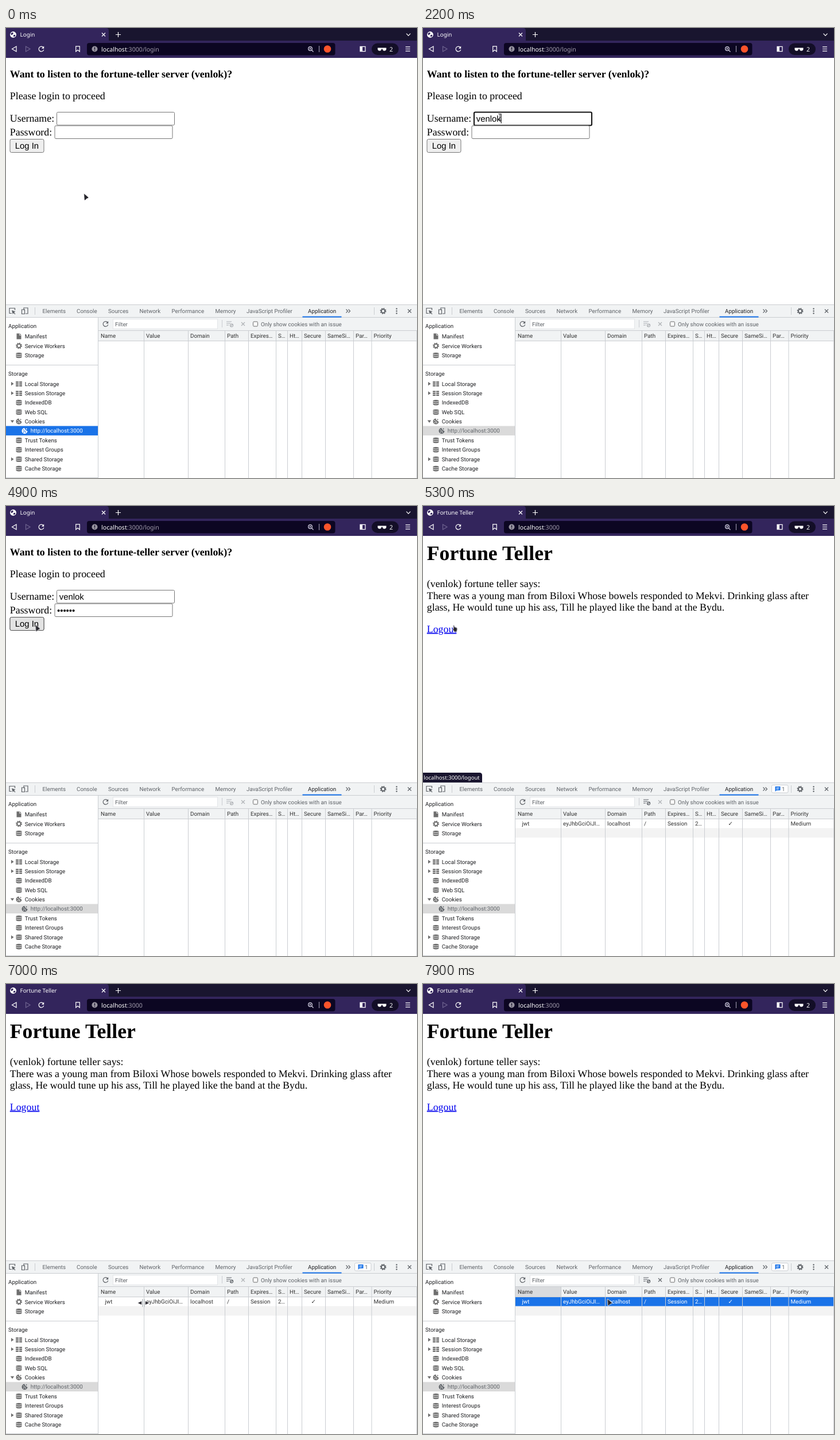
An HTML page for the animation above (8000 ms loop, 716x783 px).

```html
<!DOCTYPE html>
<html lang="en">
<head>
<meta charset="utf-8">
<title>Login demo</title>
<style>
html, body { margin: 0; width: 100%; height: 100%; overflow: hidden; background: #fff; }
svg { display: block; width: 716px; height: 783px; }
text { text-rendering: geometricPrecision; white-space: pre; }
.page { font: 17.85px "Liberation Serif", serif; }
.bold { font-weight: 700; }
.h1 { font: 700 35.7px "Liberation Serif", serif; }
.form { font: 14.88px "Liberation Sans", sans-serif; }
.tab { font: 9.9px "Noto Sans", sans-serif; fill: #fff; }
.url { font: 10.6px "Noto Sans", sans-serif; fill: #fff; }
.hint { font: 9.55px "Noto Sans", sans-serif; fill: #fff; }
.dev { font: 9.8px Roboto, sans-serif; fill: #333; }
.side { fill: #202124; }
.tick { font: 10px "DejaVu Sans", sans-serif; fill: #333; }
.pale { fill: #fff; }
.mid { fill: #5f6368; }
.line { fill: none; stroke: currentColor; stroke-width: 1.2; }
.link { fill: #00e; text-decoration: underline; }
.anim { animation: 8s step-end infinite; }
</style>
</head>
<body>
<script>
const LOOP = 8000;
const USER = 'venlok';
const rules = [];

const pct = ms => +(ms / LOOP * 100).toFixed(3) + '%';
const text = (x, y, s, cls = 'dev') => `<text x="${x}" y="${y}" class="${cls}">${s}</text>`;
const rect = (x, y, w, h, fill, more = '') => `<rect x="${x}" y="${y}" width="${w}" height="${h}" fill="${fill}" ${more}/>`;
const path = (d, more = 'class="line"') => `<path d="${d}" ${more}/>`;
const at = (x, y, s, color = '#5f6368') => `<g transform="translate(${x} ${y})" color="${color}">${s}</g>`;

function animate(frames, content) {
  const name = 'k' + rules.length;
  rules.push(`@keyframes ${name}{${frames}}`);
  return `<g class="anim" style="animation-name:${name}">${content}</g>`;
}
const during = (from, to, content) => animate(
  `0%{opacity:0}${pct(from)}{opacity:1}${pct(to)}{opacity:0}`, content);

// Icons, centred on 0,0
const solid = 'fill="currentColor"';
const icon = {
  close: path('M-3-3 3 3M3-3-3 3'),
  plus: path('M-4.5 0H4.5M0-4.5V4.5'),
  reload: path('M3.6-2.6A4.4 4.4 0 1 0 4.3 1.2') + path('M4.7-5V-.8H.5Z', solid),
  gear: `<circle r="3.2" class="line" style="stroke-width:2"/><circle r="4.7" class="line" style="stroke-width:1.6" stroke-dasharray="1.9 1.79"/>`,
  file: path('M-4-5H1.5L4-2.5V5H-4Z', solid) + path('M1-5V-2H4', 'fill="none" stroke="#fff" stroke-width=".8"'),
  store: path('M-5-3Q-5-4.8 0-4.8T5-3V3Q5 4.8 0 4.8T-5 3Z', solid) +
    path('M-5-1.9Q0-.4 5-1.9M-5 1.3Q0 2.8 5 1.3', 'fill="none" stroke="#fff" stroke-width=".9"'),
  grid: [-4, -.8, 2.4].map(y => rect(-5.5, y, 5, 2.3, 'currentColor') + rect(.5, y, 5, 2.3, 'currentColor')).join(''),
  cookie: path('M0-5A5 5 0 1 0 5 0Q3 .6 2.6-1.6Q0-1.5 0-5Z', solid) +
    [[-2, -1.5], [-1.8, 2], [1.4, 2.2], [.2, .2]].map(([x, y]) => `<circle cx="${x}" cy="${y}" r=".9" fill="#fff"/>`).join('') +
    `<circle cx="3" cy="-3.4" r="1" ${solid}/>`,
  clear: path('M-6-4H3M-6-1H1M-6 2H-2') + `<circle cx="3" cy="2.4" r="2.6" class="line"/>` + path('M1.2 4.2 4.8.6'),
  globe: `<circle r="5.4" ${solid}/>` + path('M-4.4-1.6Q-2-4 0-3.6Q1-1.6-1-.8Q-1.6 1.4-3 .6ZM.4 1Q3-.6 4 1.2Q3 4 .8 4Z', 'fill="#33255c"'),
  shades: path('M-7.5-2.4H7.5V0Q7 2.8 4 2.8Q1.4 2.8.8-.4H-.8Q-1.4 2.8-4 2.8Q-7 2.8-7.5 0Z', solid)
};

function browser() {
  const tools = '#d8d4e6';
  return rect(0, 0, 716, 24, '#19152f') +
    path('M0 0H174Q179 0 179 5V22H0Z', 'fill="#33255c"') +
    rect(0, 22, 716, 30, '#33255c') +
    at(12.5, 11.5, icon.globe, '#fff') +
    during(0, 5100, text(24.5, 15, 'Login', 'tab')) +
    during(5100, LOOP, text(24.5, 15, 'Fortune Teller', 'tab')) +
    at(170, 11.5, icon.close, '#fff') + at(195.5, 11.5, icon.plus, '#fff') +
    at(701, 11.5, path('M-3.5-1.8 0 1.8 3.5-1.8'), '#fff') +
    at(14.5, 36.5, path('M3.5-4.5V4.5L-4 0Z'), '#fff') +
    at(38, 36.5, path('M-3.5-4.5V4.5L4 0Z'), '#6f6490') +
    at(61.5, 36.5, icon.reload, '#fff') +
    at(125, 36.5, path('M-3.3-4.7H3.3V4.5L0 1.8-3.3 4.5Z'), '#fff') +
    rect(141, 26, 432.5, 21.5, '#0c0622', 'rx="4"') +
    at(154.5, 36.5, `<circle r="5" ${solid}/>` + path('M0-3V.7M0 1.8V3', 'stroke="#0c0622" stroke-width="1.3"'), '#96929f') +
    text(166, 40.5, 'localhost<tspan fill="#a09bab">:3000</tspan>', 'url') +
    during(0, 5100, text(238, 40.5, '<tspan fill="#a09bab">/login</tspan>', 'url')) +
    at(530, 36, '<circle r="3.3" class="line"/>' + path('M2.4 2.4 5.5 5.5M-1.6 0H1.6M0-1.6V1.6'), tools) +
    rect(545, 31, 1, 11, '#aaa5ba') +
    '<circle cx="560" cy="36.5" r="6.3" fill="#fb542b"/>' +
    at(621.5, 36.5, path('M-4.5-4.2H4.5V4.2H-4.5Z') + rect(-4.5, -4.2, 4, 8.4, 'currentColor'), '#fff') +
    rect(637, 26.5, 47, 20.5, '#130e27', 'rx="10.2"') +
    at(655, 37, icon.shades, '#fff') + text(668, 40.7, '2', 'url') +
    at(700, 36.5, path('M-4-3.7H4M-4 0H4M-4 3.7H4'), '#fff');
}

const box = (x, y, focus) => focus
  ? rect(x + .5, y + .5, 205, 23, '#fff', 'rx="2" stroke="#101010" stroke-width="2"')
  : rect(x + .5, y + .5, 205, 22.5, '#fff', 'rx="2" stroke="#767676"');

const pen = document.createElement('canvas').getContext('2d');
pen.font = '14.88px "Liberation Sans", sans-serif';

// steps: [time, letters shown]; the caret leaves at blur
function typed(x, y, word, steps, blur, end) {
  return steps.map(([t, n], i) => {
    const part = word.slice(0, n);
    const caret = rect(x + pen.measureText(part).width, y - 13, 1, 16, '#000');
    const next = i + 1 < steps.length ? steps[i + 1][0] : 0;
    return during(t, next || end, text(x, y, part, 'form')) + during(t, next || blur, caret);
  }).join('');
}

function loginPage() {
  const button = (fill, edge) => rect(7, 193.5, 59, 23, fill, `rx="2.5" stroke="${edge}"`);
  return text(6.8, 85.5, `Want to listen to the fortune-teller server (${USER})?`, 'page bold') +
    text(6.8, 123.5, 'Please login to proceed', 'page') +
    text(6.8, 163, 'Username:', 'page') + text(6.8, 187, 'Password:', 'page') +
    box(88, 146) + during(900, 2900, box(88.5, 146, true)) +
    box(84.5, 169.5) + during(2900, 4900, box(85, 169.5, true)) +
    typed(92.7, 163, USER, [[900, 0], [1300, 1], [1700, 2], [1900, 4], [2100, 5], [2200, 6]], 2900, 5100) +
    typed(89, 186.5, '•'.repeat(6), [[2900, 0], [3100, 1], ...[2, 3, 4, 5, 6].map(n => [3200 + n * 100, n])], 4900, 5100) +
    button('#efefef', '#767676') + during(4600, 5100, button('#e3e3e3', '#4f4f4f')) +
    text(15.7, 210.3, 'Log In', 'form');
}

function fortunePage() {
  return text(6.8, 94, 'Fortune Teller', 'h1') +
    text(6.8, 141.3, `(${USER}) fortune teller says:`, 'page') +
    text(6.8, 161.5, 'There was a young man from Biloxi Whose bowels responded to Mekvi. Drinking glass after', 'page') +
    text(6.8, 181.5, 'glass, He would tune up his ass, Till he played like the band at the Bydu.', 'page') +
    text(6.8, 219.7, 'Logout', 'page link') +
    during(5300, 6500, path('M0 464H98.5Q103 464 103 468.5V481H0Z', 'fill="#19152f"') +
      text(1.3, 475.8, 'localhost:3000/logout', 'hint'));
}

const EDGE = '#cacdd1', BAR = '#f1f3f4', BLUE = '#1a73e8';

function toolbar() {
  const tabs = { Elements: 63.5, Console: 123, Sources: 178, Network: 232.5, Performance: 288.5, Memory: 364.5, 'JavaScript Profiler': 419 };
  const names = Object.entries(tabs).map(([s, x]) => text(x, 496, s, 'dev mid')).join('');
  return rect(0, 481, 716, 23, BAR) + rect(0, 481, 716, 1, EDGE) + rect(0, 503, 716, 1, EDGE) +
    at(11, 492, path('M4.5-1V-4.5H-5V4.5H-1') + path('M-1-1 5.5 1.5 3 3 5.5 5.5 4.5 6.3 2 4 .7 6Z', solid)) +
    at(33, 492, path('M-2-1V-5H5V5H1M-5.5-2H-.5V5.5H-5.5Z')) +
    rect(50, 486, 1, 13, EDGE) + names + text(526, 496, 'Application', 'dev side') +
    rect(516.5, 501.6, 68, 2, BLUE) +
    at(596, 492.5, path('M-3.5-3-.5 0-3.5 3M.5-3 3.5 0 .5 3')) +
    during(5200, LOOP, rect(607.5, 485.5, 28.5, 13.5, '#fff', `rx="2" stroke="${EDGE}"`) +
      at(618, 492, path('M-4.5-4H4.5V2.8H-2L-4.5 5Z', solid) + path('M-2.5-1.7H2.5M-2.5.5H1.5', 'stroke="#fff"'), BLUE) +
      text(625, 496, '1', 'dev mid')) +
    rect(641, 486, 1, 13, EDGE) + at(657, 492.5, icon.gear) +
    at(680.5, 492.5, [-4, 0, 4].map(y => `<circle cy="${y}" r="1.2" ${solid}/>`).join('')) +
    at(703, 492.5, icon.close);
}

function sidebar() {
  const rows = [
    ['Manifest', 'file', 536.5], ['Service Workers', 'gear', 553], ['Storage', 'store', 569.5],
    ...['Local Storage/grid/>', 'Session Storage/grid/>', 'IndexedDB/store', 'Web SQL/store', 'Cookies/cookie/v', '',
      'Trust Tokens/store', 'Interest Groups/store', 'Shared Storage/store/>', 'Cache Storage/store']
      .map((s, i) => { const [name, pic, arrow] = s.split('/'); return [name, pic, 619 + i * 16.4, arrow]; })
  ];
  const arrows = { '>': 'M-2-3.2 2.5 0-2 3.2Z', v: 'M-3.2-2H3.2L0 2.5Z' };
  const site = (fill, cls, color) => rect(0, 692.5, 160, 16.4, fill) +
    at(32.5, 701, icon.cookie.replaceAll('#fff', fill), color) + text(42.7, 704.4, 'http://localhost:3000', cls);
  return rect(0, 504, 160, 279, '#fff') +
    text(4, 521.5, 'Application', 'dev side') + text(4, 604.5, 'Storage', 'dev side') +
    rect(0, 586, 160, 1, EDGE) +
    rows.filter(r => r[0]).map(([name, pic, y, arrow]) => at(22.5, y, icon[pic], '#6e6e6e') +
      text(32.7, y + 3.5, name, 'dev side') +
      (arrow ? at(11, y, path(arrows[arrow], solid), '#6e6e6e') : '')).join('') +
    during(0, 900, site(BLUE, 'dev pale', '#fff')) +
    during(900, LOOP, site('#dadada', 'dev mid', '#5f6368')) +
    rect(160, 504, 1, 279, EDGE) + rect(0, 782, 160, 1, EDGE);
}

function table() {
  const cols = [['Name', 161, 'jwt'], ['Value', 240, 'eyJhbGciOiJI…'], ['Domain', 317, 'localhost'], ['Path', 381, '/'],
    ['Expires…', 422, 'Session'], ['S…', 470, '2…'], ['Ht…', 490, ''], ['Secure', 515, ''],
    ['SameSi…', 556, ''], ['Par…', 605, ''], ['Priority', 636.5, 'Medium']];
  const cells = cls => cols.map(([, x, s], i) => s && text(x + (i ? 4 : 11.5), 555.7, s, 'dev ' + cls)).join('') +
    text(531.5, 556, '✓', 'tick ' + cls);
  const faded = '#aeb1b5';
  return rect(161, 504, 555, 40, BAR) + rect(161, 526, 555, 1, EDGE) +
    at(173.5, 515, icon.reload) +
    rect(186.5, 506.5, 182, 17, '#fff', 'stroke="#e3e5e8"') + text(190, 518.5, 'Filter', 'dev mid') +
    rect(376, 508, 1, 13, EDGE) +
    during(0, 5200, at(390, 515, icon.clear, faded)) + during(5200, LOOP, at(390, 515, icon.clear)) +
    during(0, 7300, at(413, 515, icon.close, faded)) + during(7300, LOOP, at(413, 515, icon.close)) +
    rect(430.5, 511, 8, 8, '#fff', 'rx="1.5" stroke="#6b6b6b"') +
    text(444, 518.5, 'Only show cookies with an issue', 'dev mid') +
    during(7700, LOOP, rect(161, 527, 79, 17, '#d9dbde')) +
    during(5200, LOOP, rect(161, 560.5, 555, 16.5, '#f3f3f3')) +
    during(7300, LOOP, rect(161, 544, 555, 16.5, BLUE)) +
    rect(161, 544, 555, 1, EDGE) +
    cols.map(([s, x], i) => text(x + 4, 538.5, s) + (i ? rect(x, 527, 1, 256, EDGE) : '')).join('') +
    during(5200, 7300, cells('')) + during(7300, LOOP, cells('pale')) +
    rect(715, 527, 1, 256, EDGE);
}

function pointer() {
  const stops = [[0, 136, 289]];
  // Eased travel, sampled every 100 ms
  const glide = (start, end, x, y) => {
    const [, x0, y0] = stops[stops.length - 1];
    const n = (end - start) / 100 + 1;
    for (let i = 1; i <= n; i++) {
      const k = i / n, e = k * k * (3 - 2 * k);
      stops.push([start + (i - 1) * 100, x0 + (x - x0) * e, y0 + (y - y0) * e]);
    }
  };
  glide(100, 800, 134, 155);
  glide(4400, 4700, 51.5, 207.5);
  glide(6400, 7000, 239.5, 555);
  glide(7100, 7100, 265, 552);
  glide(7300, 7500, 113, 542);
  glide(7700, 7900, 321.5, 549);

  const ink = 'fill="#25242b" stroke="#fff" stroke-width=".8" stroke-linejoin="round"';
  const arrow = path('M-.3-.6Q0-1 .6-.6L7.6 5.4Q8.4 6.6 7 7.2L4.6 8 2.2 10.6Q.8 11.6.3 10Z', ink);
  const hand = path('M1 0Q2.5-1 3 .8L3.4 3 6.8 4Q8.6 4.6 8.2 7L7.4 11.4H3L.2 7.2Q-.2 5.8 1.6 6Z', ink);
  const beam = path('M-2.5-5.5H-.8Q0-5.5 0-4.5V4.5Q0 5.5-.8 5.5H-2.5M2.5-5.5H.8Q0-5.5 0-4.5M0 4.5Q0 5.5.8 5.5H2.5', 'fill="none" stroke="#25242b"');
  const resize = rect(-2.5, -7, 5, 14, '#fff') + path('M-10.5 0-3-3.6V3.6ZM10.5 0 3-3.6V3.6Z', ink) +
    path('M-1.5-7V7M1.5-7V7', 'stroke="#8a9499" stroke-width=".9"');
  const looks = [[0, 700, arrow], [700, 4600, beam], [4600, 5300, arrow], [5300, 6400, hand],
    [6400, 7000, arrow], [7000, 7100, resize], [7100, LOOP, arrow]];
  return animate(
    stops.map(([t, x, y]) => `${pct(t)}{transform:translate(${x.toFixed(1)}px,${y.toFixed(1)}px)}`).join(''),
    looks.map(l => during(...l)).join(''));
}

const scene = rect(0, 0, 716, 783, '#fff') + browser() +
  during(0, 5100, loginPage()) + during(5100, LOOP, fortunePage()) +
  toolbar() + sidebar() + table() + pointer();

const sheet = document.createElement('style');
sheet.textContent = rules.join('\n');
document.head.append(sheet);
document.body.innerHTML = `<svg viewBox="0 0 716 783">${scene}</svg>`;
</script>
</body>
</html>
```
